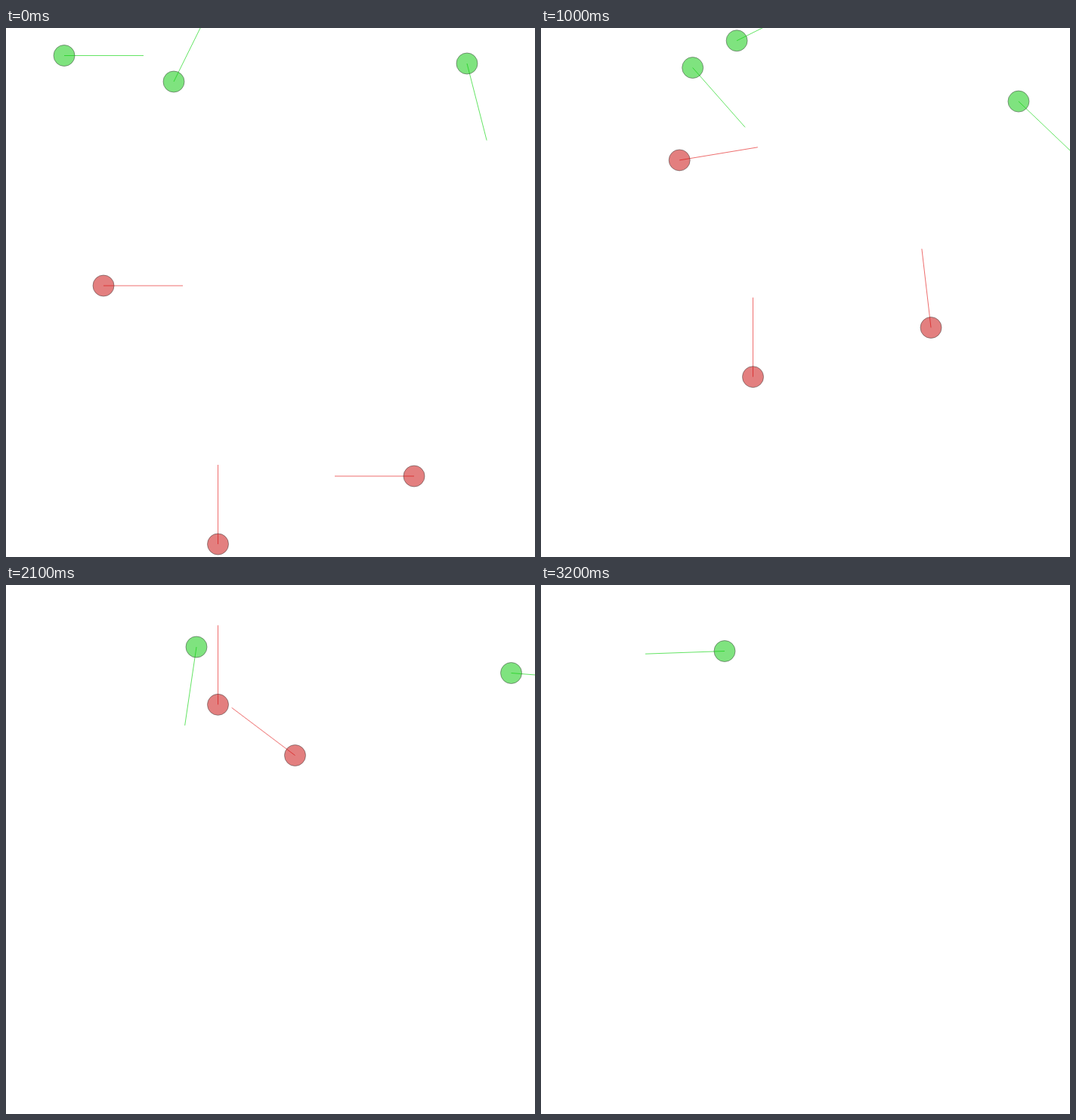
These frames come from a looping animation (700x700 px, 3300 ms). An HTML page with a canvas:

```html
<!DOCTYPE html>
<html lang="en">
<head>
<meta charset="utf-8">
<title>Walkers</title>
<style>
  html, body { margin: 0; width: 100%; height: 100%; overflow: hidden; background: #fff; }
  canvas { display: block; }
</style>
</head>
<body>
<canvas id="stage" width="700" height="700"></canvas>
<script>
const ctx = document.getElementById("stage").getContext("2d");
const STEP = 100, STEPS = 33, RADIUS = 14, REACH = 105;
const KEEP = 0.72;       // share of its velocity a walker keeps each step
const START_SPEED = 5;
const RAD = Math.PI / 180;

const RED = { fill: "rgba(200,0,0,0.5)", line: "#ee6e6e" };
const GREEN = { fill: "rgba(0,200,0,0.5)", line: "#64e464" };

// Distance covered in n steps per unit of the starting velocity.
const glide = n => KEEP / (1 - KEEP) * (1 - Math.pow(KEEP, n));

// Each stop is [step, x, y, heading]; a walker leaves after its last stop.
// On every leg it steers steadily along the course that reaches the next stop in time.
function walker(color, ...stops) {
  const [, , , aim] = stops[0];
  let vx = START_SPEED * Math.cos(aim * RAD), vy = START_SPEED * Math.sin(aim * RAD);
  const legs = stops.slice(1).map((stop, i) => {
    const [t, x, y] = stops[i], n = stop[0] - t, g = glide(n);
    const ux = (stop[1] - x - vx * g) / (n - g);
    const uy = (stop[2] - y - vy * g) / (n - g);
    const course = Math.atan2(uy, ux) / RAD;
    const facing = stop[3] === undefined ? course : stop[3];
    const turn = ((facing - course) % 360 + 540) % 360 - 180;
    const leg = { t, n, x, y, vx, vy, ux, uy, course, turn };
    const k = Math.pow(KEEP, n);
    vx = ux + (vx - ux) * k;
    vy = uy + (vy - uy) * k;
    return leg;
  });
  return { color, aim, legs, last: stops[stops.length - 1][0] };
}

const walkers = [
  walker(GREEN, [0, 77, 36.5, 0], [7, 193, 34, -7.7], [11, 282, 8]),
  walker(GREEN, [0, 222, 71, -63.7], [7, 198.5, 42, -154], [13, 216, 79.5, 21],
    [17, 245, 85, 14], [21, 252, 82, 98.4], [28, 250.5, 95, -165.3], [32, 243, 87.5, 178]),
  walker(GREEN, [0, 610, 47, 75.6], [7, 622, 83, 45.4], [13, 645, 110, 56.8],
    [17, 654.5, 117, 11], [21, 668.5, 116.5, 4.5], [27, 697, 115]),
  walker(RED, [0, 129, 341, 0], [7, 147, 218], [13, 242, 152, -11.8], [16, 288, 108]),
  walker(RED, [0, 540, 593, 180], [7, 522, 470], [13, 509.5, 321, -101.2],
    [17, 450.5, 269, -150], [21, 382.5, 225.5, -143], [28, 323, 89, -97], [31, 318, 13]),
  walker(RED, [0, 280.5, 683, -90], [26, 280.5, 19.5])
];

function pose(w, n) {
  const leg = w.legs.find(l => n <= l.t + l.n);
  const m = n - leg.t, g = glide(m), s = m / leg.n;
  return {
    x: leg.x + leg.ux * (m - g) + leg.vx * g,
    y: leg.y + leg.uy * (m - g) + leg.vy * g,
    angle: (n === 0 ? w.aim : leg.course + leg.turn * s * s) * RAD
  };
}

function drawWalker(w, n) {
  const { x, y, angle } = pose(w, n);
  ctx.lineWidth = 1;
  ctx.strokeStyle = w.color.line;
  ctx.beginPath();
  ctx.moveTo(x, y);
  ctx.lineTo(x + REACH * Math.cos(angle), y + REACH * Math.sin(angle));
  ctx.stroke();

  ctx.beginPath();
  ctx.arc(x, y, RADIUS, 0, Math.PI * 2);
  ctx.fillStyle = w.color.fill;
  ctx.fill();
  ctx.strokeStyle = "rgba(60,60,60,0.5)";
  ctx.stroke();
}

const start = performance.now();

function draw(now) {
  const n = Math.floor(Math.max(0, now - start) / STEP) % STEPS;
  ctx.fillStyle = "#fff";
  ctx.fillRect(0, 0, 700, 700);
  for (const w of walkers) if (n <= w.last) drawWalker(w, n);
  requestAnimationFrame(draw);
}

draw(start);
</script>
</body>
</html>
```
